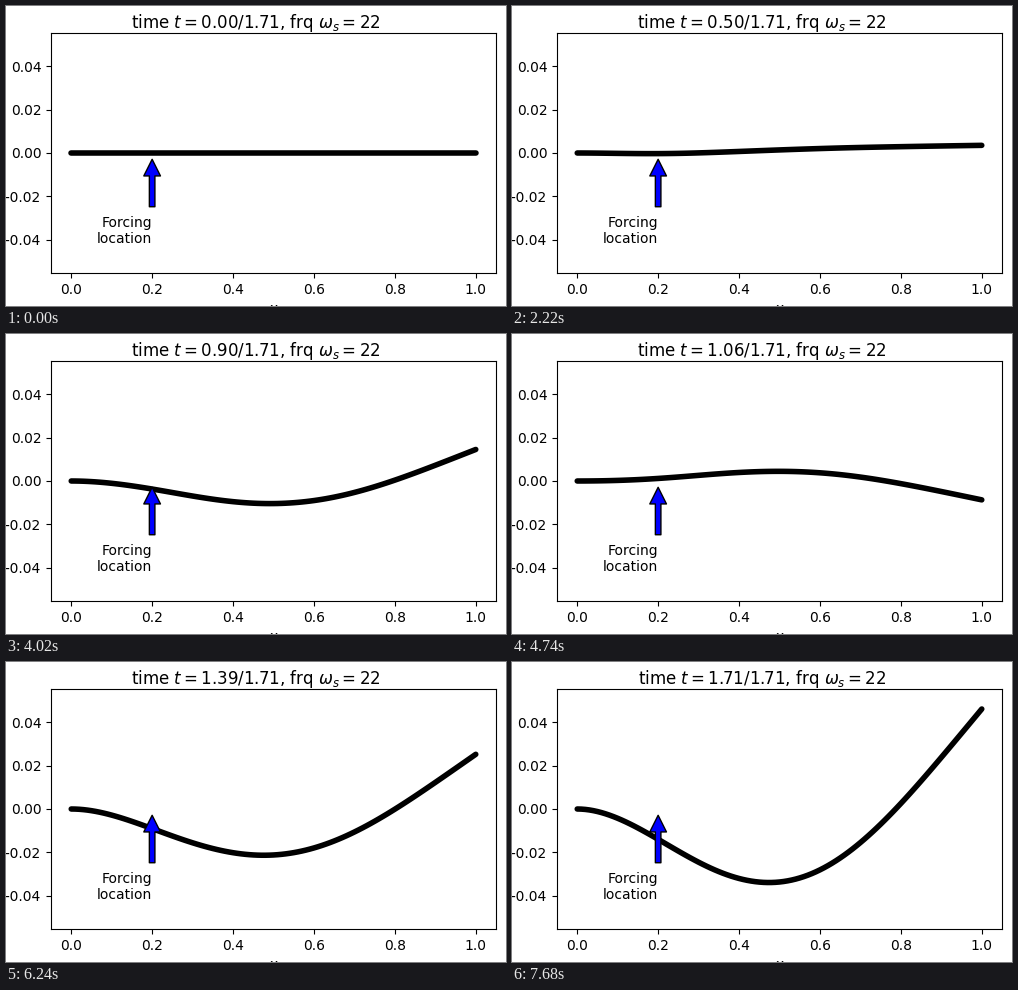
These frames come from a looping animation (500x300 px, 7.71 s). A matplotlib script:

```python
import numpy as np
import matplotlib.pyplot as plt
from matplotlib.animation import FuncAnimation

FRAMES = 257
OMEGA = 22.0                        # forcing frequency
X_FORCE = 0.2                       # forcing location
T_END = 6 * 2 * np.pi / OMEGA
MODES = 8


def wave_number(n):
    """Root of cos(b) cosh(b) = -1 for the n-th cantilever mode."""
    b = 1.875 if n == 1 else (n - 0.5) * np.pi
    for _ in range(20):
        b -= (np.cos(b) + 1 / np.cosh(b)) / (-np.sin(b) - np.tanh(b) / np.cosh(b))
    return b


def shape(b, x):
    s = (np.cosh(b) + np.cos(b)) / (np.sinh(b) + np.sin(b))
    return np.cosh(b * x) - np.cos(b * x) - s * (np.sinh(b * x) - np.sin(b * x))


def amplitude(b, t):
    """Modal response from rest to a unit point force sin(OMEGA t)."""
    w = b ** 2
    gain = shape(b, X_FORCE) / (w ** 2 - OMEGA ** 2)
    return gain * (np.sin(OMEGA * t) - OMEGA / w * np.sin(w * t))


x = np.linspace(0, 1, 101)
times = np.linspace(0, T_END, FRAMES)
betas = [wave_number(n) for n in range(1, MODES + 1)]
beam = sum(np.outer(amplitude(b, times), shape(b, x)) for b in betas)
y_max = 1.2 * np.abs(beam).max()

fig, ax = plt.subplots(figsize=(5, 3), dpi=100)
fig.subplots_adjust(left=0.09, right=0.98, top=0.91, bottom=0.11)
ax.set_xlim(-0.05, 1.05)
ax.set_ylim(-y_max, y_max)
ax.set_xlabel('x')
line, = ax.plot(x, beam[0], 'k', lw=4, solid_capstyle='round')
ax.annotate('Forcing\nlocation', xy=(X_FORCE, 0), xytext=(X_FORCE, -0.75 * y_max),
            ha='right', arrowprops=dict(facecolor='blue', shrink=0.1))
title = fig.suptitle('')


def update(i):
    line.set_ydata(beam[i])
    title.set_text(rf'time $t={times[i]:.2f}/{T_END:.2f}$, frq $\omega_s={OMEGA:.0f}$')
    return line, title


anim = FuncAnimation(fig, update, frames=FRAMES, interval=30, repeat=True)
plt.show()
```
